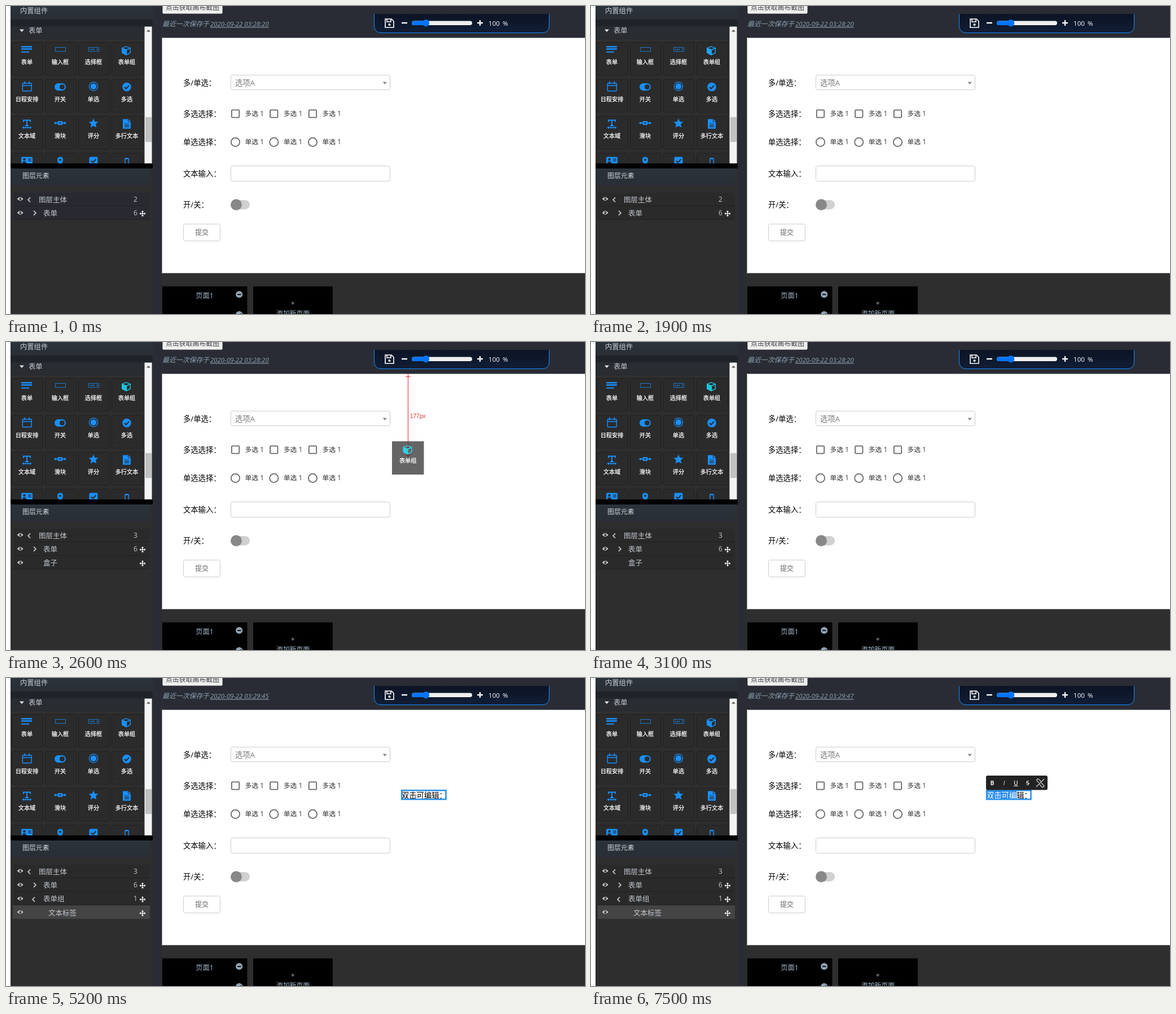
Recreate the animation shown at these times as an HTML page. Size 1026x546 px, loop 8 s.

```html
<!DOCTYPE html>
<html lang="zh-CN">
<head>
<meta charset="utf-8">
<title>表单编辑器</title>
<style>
html, body { margin: 0; width: 100%; height: 100%; overflow: hidden; background: #2e2e2e; }
svg { display: block; width: 1026px; height: 546px; }
text { font-family: "Open Sans", "Noto Sans CJK SC", "Noto Sans CJK", sans-serif; white-space: pre; }
.mono { font-family: "Liberation Sans", Arial, sans-serif; }
.tile { font-weight: 500; stroke: #fff; stroke-width: .25px; }
</style>
</head>
<body>
<svg id="stage" viewBox="0 0 1026 546" xmlns="http://www.w3.org/2000/svg"></svg>
<script>
const LOOP = 8000;
const BLUE = '#1890ff';
const DARK = '#2c2c2c';

// y is the vertical middle of the line
const text = (x, y, size, fill, str, extra = '') =>
  `<text x="${x}" y="${(y + size * 0.37).toFixed(2)}" font-size="${size}" fill="${fill}" ${extra}>${str}</text>`;
const rect = (x, y, w, h, fill, extra = '') =>
  `<rect x="${x}" y="${y}" width="${w}" height="${h}" fill="${fill}" ${extra}/>`;
const frame = (x, y, w, h, stroke, r = 0, sw = 1, extra = '') =>
  rect(x, y, w, h, 'none', `rx="${r}" stroke="${stroke}" stroke-width="${sw}" ${extra}`);
const path = (d, fill, extra = '') => `<path d="${d}" fill="${fill}" ${extra}/>`;
const line = (d, stroke, sw = 1, extra = '') =>
  path(d, 'none', `stroke="${stroke}" stroke-width="${sw}" ${extra}`);
const circle = (x, y, r, fill, extra = '') => `<circle cx="${x}" cy="${y}" r="${r}" fill="${fill}" ${extra}/>`;
const group = (id, body, extra = '') => `<g id="${id}" ${extra}>${body}</g>`;
const MID = 'text-anchor="middle"';

// top and right faces are open
const cube = path('M0-8L8-5V4.5L0 8.5L-8 4.5V-5ZM-5.8-4.5L0-2.3L5.8-4.5L0-6.6ZM1.2-.8V6.2L6.6 3.5V-2.9Z',
  'currentColor', 'fill-rule="evenodd"');

// icons are drawn around their own centre
const icons = [
  ['表单', 0, rect(-10, -6, 19, 2.5, BLUE) + rect(-10, -2, 19, 2.5, BLUE) + rect(-10, 3.5, 14, 2, BLUE)],
  ['输入框', 0, frame(-8.5, -3.5, 18, 7, '#1a78d0')],
  ['选择框', 0, frame(-8.5, -3.5, 18, 7, '#1a78d0') + line('M-6 0H3', BLUE, 1.5, 'stroke-dasharray="2 1"') + path('M5-1h3l-1.5 2z', BLUE)],
  ['表单组', 2, group('cube', cube)],
  ['日程安排', 0, frame(-7.7, -5.7, 16, 14, BLUE, 1.5, 1.5) + line('M-8-1.5H8M-4-9V-4M4.5-9V-4', BLUE, 1.5)],
  ['开关', 1, rect(-10, -6.5, 20, 13, BLUE, 'rx="6.5"') + circle(3.5, 0, 4.5, DARK)],
  ['单选', 0, circle(0, 0, 7.6, 'none', `stroke="${BLUE}" stroke-width="1.3"`) + circle(0, 0, 5.2, BLUE)],
  ['多选', 1, circle(0, 0, 7.8, BLUE) + line('M-4 .3L-1.2 3L4-2.5', DARK, 2)],
  ['文本域', 1, line('M-6-3.5V-6.5H6V-3.5M0-6.5V3M-3 3H3M-7 6.5H7', BLUE, 2) + path('M-8.5 6.5l3-2.5v5zM8.5 6.5l-3-2.5v5z', BLUE)],
  ['滑块', 0, line('M-10-.5H10', BLUE, 2) + rect(-4.5, -4, 9, 7, BLUE, 'rx="2"') + rect(-2, -1.5, 4, 2, DARK) + circle(-8.5, -.5, 2, BLUE) + circle(8.5, -.5, 2, BLUE)],
  ['评分', 0, path('M0-8.5L2.5-3L8.3-2.4L4 1.5L5.2 7.5L0 4.5L-5.2 7.5L-4 1.5L-8.3-2.4L-2.5-3Z', BLUE)],
  ['多行文本', 1, path('M-7-8.5H2V-3.5H7V8.5H-7ZM3-8.5L7-4.5H3Z', BLUE) + line('M-4 0H4M-4 2.6H4M-4 5.2H4', DARK, 1.2)],
  ['', 0, rect(-10, -6, 20, 15, BLUE, 'rx="2"') + circle(-4.5, -1.5, 2.2, DARK) + rect(-8, 2, 7, 4, DARK, 'rx="2"') + line('M2-2H8M2 1H8', DARK, 1.3)],
  ['', 0, path('M0 10L-4.5 2.5Q-6.5-6 0-6Q6.5-6 4.5 2.5Z', BLUE) + circle(0, -.8, 1.9, DARK)],
  ['', 0, rect(-7.5, -6, 15, 15, BLUE, 'rx="2"') + line('M-4 1L-1 4L4.5-2', DARK, 2)],
  ['', 0, frame(-3.2, -3.5, 6.4, 13, BLUE, 1.5, 1.5) + line('M-3-3H3', BLUE, 2)],
];

function palette() {
  let out = '';
  icons.forEach(([name, dy, art], i) => {
    const x = 10.5 + (i % 4) * 59, y = 64.5 + Math.floor(i / 4) * 65.5;
    const cx = 37 + (i % 4) * 59;
    out += rect(x, y, 55, 58, '#2b2b2b', 'rx="2" stroke="#211f22"');
    out += `<g transform="translate(${cx - (i === 3 ? 1 : 0)} ${y + 12.5 + dy})">${art}</g>`;
    out += text(cx, y + 35, 10.2, '#fff', name, MID + ' class="tile"');
  });
  return `<clipPath id="pal"><rect x="8" y="60" width="238" height="219"/></clipPath><g clip-path="url(#pal)">${out}</g>`;
}

const eye = y => path(`M20 ${y}Q25 ${y - 6.5} 30.5 ${y}Q25 ${y + 6.5} 20 ${y}Z`, '#e4e4e4') +
  circle(25.2, y, 2.4, DARK) + circle(24.6, y - .7, .9, '#e4e4e4');
const chevron = (x, y, dir) => line(`M${x - 2 * dir} ${y - 4}l${4 * dir} 4l${-4 * dir} 4`, '#b9b9b9', 1.8);
const mover = y => line(`M237.5 ${y}H246.5M242 ${y - 4.5}V${y + 4.5}`, '#eee', 1.5) +
  path(`M236.5 ${y}l2.5-2.3v4.6zM247.5 ${y}l-2.5-2.3v4.6zM242 ${y - 5.5}l2.3 2.5h-4.6zM242 ${y + 5.5}l2.3-2.5h-4.6z`, '#eee');
const rowBg = y => rect(12, y, 243, 24, '#2a2a2a', 'class="row"') + rect(12, y + 23, 243, 1, '#222');
const rowText = (x, y, str) => text(x, y, 12.5, '#c3c9d0', str);
const count = (y, n, id = '') => text(229.5, y, 12, '#c3c9d0', n, MID + (id && ` id="${id}"`));

function leftPanel() {
  return rect(0, 0, 8, 546, '#fff') + rect(8, 0, 252, 546, '#2e2e2e') + rect(260, 0, 16, 546, '#292c34') +
    rect(8, 0, 252, 24, 'url(#head)') + text(25, 8, 12.3, '#c9ced4', '内置组件') +
    rect(8, 24, 252, 12, '#20242a') + rect(8, 36, 238, 24, '#292c30') + rect(8, 60, 238, 1, '#39342f') +
    path('M24 41.5H32L28 46Z', '#e8e8e8') + text(40, 43, 12.3, '#c9ced4', '表单') +
    palette() +
    rect(245.5, 36.5, 13, 242.5, '#f4f4f4') + rect(247, 197, 11, 44, '#c1c1c1') + path('M249 45.5H256L252.5 42Z', '#555') +
    rect(8, 279, 252, 9, '#000') + rect(8, 288, 248, 30, 'url(#head)') + text(29, 301, 11.9, '#d3d8dd', '图层元素') +
    rowBg(331) + eye(342) + chevron(41, 343.5, -1) + rowText(58, 343, '图层主体') + count(342.5, 2, 'total') +
    rowBg(355) + eye(366.5) + chevron(51, 367, 1) + rowText(66, 367, '表单') + count(367, 6) + mover(368) +
    group('row3', rowBg(379) + eye(391) + mover(392.5) +
      group('box', rowText(66, 391, '盒子')) +
      group('formGroup', rowText(66, 391, '表单组') + count(391, 1)) +
      group('closed', chevron(51, 391.5, 1)) + group('open', chevron(49, 392.5, -1))) +
    group('row4', rect(12, 403, 243, 24, '#444') + eye(415) + rowText(75, 416, '文本标签') + mover(417));
}

function topBar() {
  return rect(276, 0, 750, 56, '#292c34') +
    rect(277.5, -10, 106, 23.5, '#efefef', 'rx="2" stroke="#a0a0a0"') + text(283, 3, 11.9, '#444', '点击获取画布截图') +
    text(277, 32, 11.9, '#8fa3b5', '最近一次保存于', 'font-style="italic"') +
    text(362, 32, 11.4, '#8fa3b5', '', 'id="saved" font-style="italic" text-decoration="underline"') +
    path('M652.5 14V35Q652.5 47.5 665 47.5H950Q962.5 47.5 962.5 35V14', 'url(#bar)', `stroke="${BLUE}"`) +
    line('M672 23H683L687 27V38H672ZM675 23.5V28H682V23.5', '#fff', 1.6) + circle(679.5, 33, 2.1, '#fff') +
    line('M701 30H711M835 30H845M840 25V35', '#f4f4f4', 2.4) +
    rect(719, 26.5, 107, 7.5, '#efefef', 'rx="3.7"') + rect(719, 26.5, 25, 7.5, '#0075ff', 'rx="3.7"') +
    circle(744, 30.2, 6.2, '#0075ff') +
    text(855, 30.5, 11.6, '#fff', '100') + text(880, 30.5, 11.6, '#fff', '%');
}

function form() {
  const label = (y, str) => text(314, y, 13.3, '#000', str);
  let out = rect(276, 56, 750, 418, '#fff') + line('M1026 56.5H276.5V473.5H1026', '#9c9ca2') +
    label(136, '多/单选：') + frame(398.5, 122.5, 282, 26, '#ccc', 3) + text(406, 136, 13.3, '#777', '选项A') +
    path('M667.5 134.5H675L671.2 139Z', '#888') +
    label(191, '多选选择：') + label(241.5, '单选选择：') +
    label(297, '文本输入：') + frame(398.5, 283.5, 282, 27, '#ccc', 3) +
    label(352.5, '开/关：') + rect(402, 344, 30, 16.5, '#d0d0d0', 'rx="8.2"') + circle(408, 352.3, 10, '#888') +
    frame(314.5, 386.5, 65, 30, '#ccc', 3) + text(347, 402, 12, '#666', '提交', MID);
  for (const x of [406.5, 474.8, 543.5]) {
    out += frame(x - 6.7, 184.3, 13.4, 13.4, '#666', 1.5, 1.8) + text(x + 17, 191, 11.8, '#333', '多选 1') +
      circle(x, 241.2, 7.6, 'none', 'stroke="#666" stroke-width="1.8"') + text(x + 17, 241, 11.8, '#333', '单选 1');
  }
  return out;
}

function pages() {
  const dot = y => circle(413.2, y, 6, '#93a4b5');
  return rect(276, 474, 750, 72, '#2e2e2e') +
    rect(277, 497, 150.5, 49, '#000', 'rx="1"') + rect(438, 497, 141, 49, '#000', 'rx="1"') +
    text(352, 513, 12.3, '#a5b8ca', '页面1', MID) +
    dot(511.3) + rect(410, 510.5, 6.5, 1.8, '#000') + dot(547) + line('M410 547l2.5 2.5l4-4.5', '#000', 1.5) +
    text(508.3, 526.5, 12, '#a5b8ca', '+', MID) + text(508.5, 545, 11.9, '#a5b8ca', '添加新页面', MID);
}

function editor() {
  const tool = (x, str, extra) => text(x, 186, 10.5, '#eee', str, `${MID} ${extra}`);
  return group('field',
      rect(701, 199, 53.5, 16, '#2f8fee', 'id="mark"') +
      text(701, 207.7, 13.3, '#000', '', 'id="words"') +
      frame(700.5, 198.5, 79.5, 17.5, '#2b90e8', 0, 1, 'id="thin"') +
      frame(701.2, 199.2, 78.3, 15.8, '#2b90e8', 0, 2.6, 'id="thick"') +
      rect(754, 201, 1, 13, '#111', 'id="caret"')) +
    group('tools', rect(700, 173, 109, 25.5, '#222', 'rx="3"') +
      tool(711, 'B', 'font-weight="700"') + tool(732, 'I', 'font-style="italic"') +
      tool(753, 'U', 'font-weight="600" text-decoration="underline"') +
      tool(774, 'S', 'font-weight="600" text-decoration="line-through"') +
      line('M794 186l-3.5-3.5a2 2 0 0 1 3-3l4 4M798 186l4 4a2 2 0 0 1-3 3l-4-4M789 193L803 179', '#ccc', 1.3));
}

function dragLayer() {
  return group('guide', line('', '#f5222d', 1, 'id="rule"') + text(0, 131, 10, '#d8322f', '', 'id="dist" class="mono"')) +
    group('ghost', rect(0, 0, 56.5, 59, DARK, 'opacity=".73"') +
      `<g transform="translate(27.5 15)" color="#35cfe6">${cube}</g>` +
      text(28.2, 34.5, 10.2, '#fff', '表单组', MID + ' class="tile"'));
}

const fade = (id, a, b) => `<linearGradient id="${id}" x2="0" y2="1"><stop stop-color="${a}"/><stop offset="1" stop-color="${b}"/></linearGradient>`;
document.getElementById('stage').innerHTML =
  `<defs>${fade('head', '#2b333b', '#2a2e35')}${fade('bar', '#0c1424', '#111e36')}</defs>` +
  topBar() + form() + pages() + leftPanel() + editor() + dragLayer();

const el = {};
document.querySelectorAll('[id]').forEach(n => el[n.id] = n);
const rows = document.querySelectorAll('.row');
const show = (id, on) => el[id].setAttribute('display', on ? 'inline' : 'none');
const at = (steps, t) => steps.reduce((v, s) => t >= s[0] ? s[1] : v, steps[0][1]);

const WORDS = '双击可编辑：';
const hover = [[0, BLUE], [1900, '#1ba4f2'], [2000, '#1bc4dc'], [3200, '#1ba4f2'], [3300, BLUE]];
const saved = [[0, '03:28:20'], [3300, '03:29:45'], [5400, '03:29:47']];
const picked = [[0, 0], [7100, 1], [7300, 2], [7400, 3], [7500, 4]];
const drag = [[0, null], [2200, [227, 131]], [2300, [432, 207]], [2400, [575, 202]], [2500, [618, 171]],
  [2600, [684, 176]], [2700, [687, 186]], [2800, [702, 179]], [2900, [712, 176]], [3100, null]];
const caretOn = [[0, 0], [5300, 1], [5800, 0], [6300, 1], [6800, 0]];

function draw(t) {
  el.cube.setAttribute('color', at(hover, t));
  el.saved.textContent = '2020-09-22 ' + at(saved, t);
  rows.forEach(r => r.setAttribute('fill', t < 200 ? '#292a31' : '#2a2a2a'));

  el.total.textContent = t < 2300 ? 2 : 3;
  show('row3', t >= 2300);
  show('box', t < 3300);
  show('formGroup', t >= 3300);
  show('closed', t >= 3300 && t < 5200);
  show('open', t >= 5200);
  show('row4', t >= 5200);

  const pos = at(drag, t);
  show('ghost', pos);
  show('guide', pos && t >= 2300);
  if (pos) {
    const [x, y] = pos, mid = x + 28;
    el.ghost.setAttribute('transform', `translate(${x} ${y})`);
    el.rule.setAttribute('d', `M${mid + .5} 56V${y + 29}M${mid - 3.5} 61.5h8M${mid - 3.5} ${y + 24.5}h8`);
    el.dist.setAttribute('x', mid + 4);
    el.dist.textContent = y + 1 + 'px';
  }

  const n = at(picked, t);
  show('field', t >= 3400);
  show('thin', t >= 3700 && t < 5200);
  show('thick', t >= 5200);
  show('tools', t >= 5300);
  show('caret', at(caretOn, t));
  el.mark.setAttribute('width', n * 13.3);
  el.words.innerHTML = `<tspan fill="#fff">${WORDS.slice(0, n)}</tspan>${WORDS.slice(n)}`;
}

const start = performance.now();
function tick(now) {
  draw(Math.max(0, now - start) % LOOP);
  requestAnimationFrame(tick);
}
tick(start);
</script>
</body>
</html>
```
